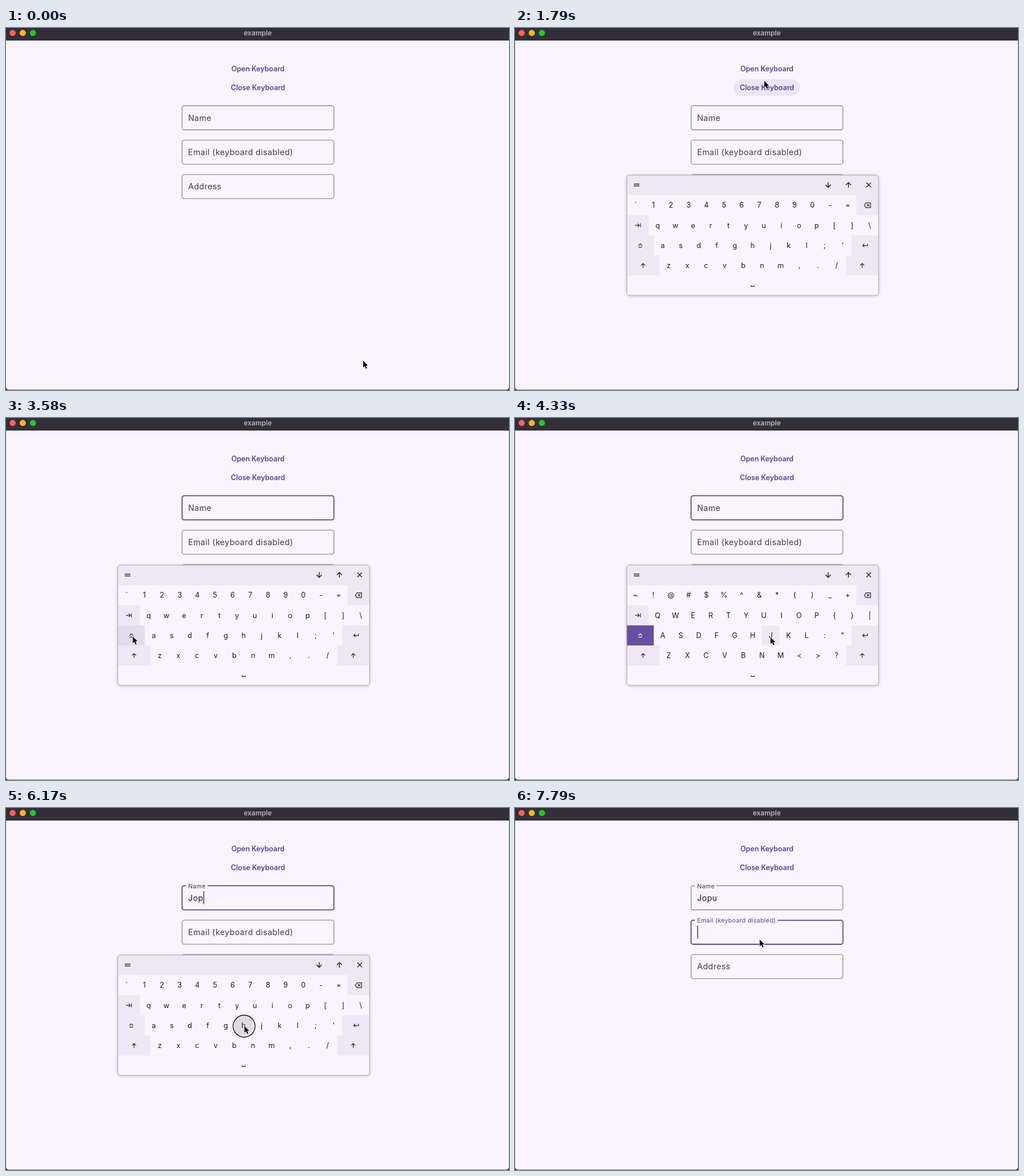
An HTML page that plays this animation: 881x635 px, repeating every 8 s.

```html
<!DOCTYPE html>
<html lang="en">
<head>
<meta charset="utf-8">
<title>example</title>
<style>
  html, body { margin: 0; width: 100%; height: 100%; overflow: hidden; background: #faf4fc; }
  svg { display: block; width: 881px; height: 635px; }
  text { font-family: Inter, Roboto, sans-serif; fill: #1d1b20; white-space: pre; }
  .mid { text-anchor: middle; }
  .key { font-size: 12.7px; text-anchor: middle; }
  .btn { font-size: 12.44px; font-weight: 600; text-anchor: middle; fill: #574392; }
  .field { font-size: 14.2px; letter-spacing: .42px; }
  .icon { fill: none; stroke: #2b2830; stroke-width: 1.2; }
  .bar { stroke-width: 1.5; }
</style>
</head>
<body>
<svg id="stage" viewBox="0 0 881 635"></svg>
<script>
const LOOP = 8000;
const BG = '#faf4fc', TINT = '#eee7f6', INK = '#1d1b20', ACCENT = '#5a4599', LINE = '#7d7881';
const stage = document.getElementById('stage');

function add(parent, tag, attrs = {}, text) {
  const node = document.createElementNS('http://www.w3.org/2000/svg', tag);
  for (const k in attrs) node.setAttribute(k, attrs[k]);
  if (text !== undefined) node.textContent = text;
  parent.appendChild(node);
  return node;
}
const set = (node, attrs) => { for (const k in attrs) node.setAttribute(k, attrs[k]); };
const show = (node, on) => node.setAttribute('visibility', on ? 'visible' : 'hidden');
const clamp = v => Math.max(0, Math.min(1, v));
const smooth = u => u * u * (3 - 2 * u);
const mix = (a, b, u) => a + (b - a) * u;
const rect = (parent, x, y, width, height, fill, more) =>
  add(parent, 'rect', { x, y, width, height, fill, ...more });

// Pointer stops: time, x, y
const STOPS = [
  [0, 625, 583], [130, 625, 583], [900, 441, 72], [1480, 440, 72], [1680, 437, 91],
  [1790, 436, 92], [2130, 435, 98], [2500, 409, 158], [2850, 409, 158], [3600, 221, 383],
  [3830, 221, 383], [4180, 447, 384], [4540, 447, 384], [4790, 222, 384], [4960, 222, 384],
  [5420, 494, 342], [5640, 495, 343], [6050, 417, 381], [6230, 417, 382], [6430, 433, 424],
  [6880, 439, 424], [7330, 428, 230], [LOOP, 428, 230]
];
const CLICKS = [1150, 2020, 2590, 3670, 4400, 4840, 5520, 6120, 6460, 7560];
const PRESSES = { j: [4400, 4480], o: [5520, 5610], h: [6120, 6210], n: [6460, 7000] };
const KEYBOARD = [[1200, 2080], [2640, 7600]];
const CAPS = [3720, 4890];
const TYPED = [4450, 5570, 6170, 6490];
const NAME = 'Jopu';
const NAME_ON = 2640, EMAIL_ON = 7600, EASE = 167;

function pointerAt(t) {
  let i = 1;
  while (i < STOPS.length - 1 && STOPS[i][0] < t) i++;
  const [t0, x0, y0] = STOPS[i - 1], [t1, x1, y1] = STOPS[i];
  const u = smooth(clamp((t - t0) / (t1 - t0)));
  return [mix(x0, x1, u), mix(y0, y1, u)];
}

// Share of the last 100 ms the pointer spent inside a box
const hover = (trail, b) => trail.filter(([x, y]) =>
  x >= b.x && x < b.x + b.w && y >= b.y && y < b.y + b.h).length / trail.length;

// Window
rect(stage, 0, 0, 881, 635, BG);
rect(stage, 0, 0, 881, 22, '#322f38');
['#fe5f57', '#fdb32b', '#2ac131'].forEach((fill, i) =>
  add(stage, 'circle', { cx: 11.6 + 17.8 * i, cy: 8.7, r: 5.4, fill }));
add(stage, 'text', { x: 441, y: 12.6, class: 'mid', 'font-size': 12, 'font-weight': 600, style: 'fill:#b5b2b8' }, 'example');

// Buttons
const buttons = [['Open Keyboard', 57], ['Close Keyboard', 90]].map(([label, y]) => {
  const box = { x: 383, y, w: 116.5, h: 28.4 };
  const pill = rect(stage, box.x, y, box.w, box.h, '#ece5f4', { rx: 14.2 });
  add(stage, 'text', { x: 441.3, y: y + 18.5, class: 'btn' }, label);
  return { box, pill };
});

// Form fields
const fields = [['Name', 136.4, 38], ['Email (keyboard disabled)', 196.8, 145], ['Address', 257, 58]].map(([text, y, gapW]) => {
  const outline = rect(stage, 308.4, y, 266, 42.2, 'none', { rx: 3.6 });
  const gap = rect(stage, 315, y - 2, 0, 4, BG);
  const label = add(stage, 'text', { class: 'field' }, text);
  return { box: { x: 308, y, w: 267, h: 42 }, y, gapW, outline, gap, label };
});
const value = add(stage, 'text', { x: 319, y: 162.7, class: 'field' });
const caret = rect(stage, 319, 146, 1.7, 22.8, ACCENT);

// Keyboard
const KX = 195.8, KY = 258, KW = 441, ROW = 35.25;
const defs = add(stage, 'defs');
const blur = add(defs, 'filter', { id: 'soft', x: '-10%', y: '-10%', width: '120%', height: '120%' });
add(blur, 'feGaussianBlur', { stdDeviation: 3 });
add(add(defs, 'clipPath', { id: 'panel' }), 'rect', { x: KX, y: KY, width: KW, height: 211, rx: 5 });
const keyboard = add(stage, 'g');
rect(keyboard, KX, KY + 1, KW, 211, '#000', { rx: 5, opacity: .22, filter: 'url(#soft)' });
const panel = add(keyboard, 'g', { 'clip-path': 'url(#panel)' });
rect(panel, KX, KY, KW, 211, BG);
rect(panel, KX, KY, KW, ROW, TINT);

const ICONS = {
  back: 'M-2.6 -4.3H5.3V4.3H-2.6L-5.6 0ZM-.9 -2L3.1 2M3.1 -2L-.9 2',
  tab: 'M-5 0H2.6M-.4 -3L2.6 0L-.4 3M4.6 -3.4V3.4',
  caps: 'M-3.2 .4L0 -2.7L3.2 .4M-3.3 3H3.3',
  enter: 'M4.3 -2.8V.2H-4M-1.4 -2.6L-4.2 .2L-1.4 3',
  shift: 'M0 4V-3.4M-3.5 0L0 -3.5L3.5 0',
  space: 'M-2.8 -.4V1.5H2.8V-.4',
  up: 'M0 4.8V-4.2M-4.5 .2L0 -4.3L4.5 .2',
  down: 'M0 -4.8V4.2M-4.5 -.2L0 4.3L4.5 -.2',
  close: 'M-4 -4L4 4M4 -4L-4 4',
  grip: 'M-5 -1.6H5M-5 1.6H5'
};
const icon = (parent, name, x, y, cls = 'icon') =>
  add(parent, 'path', { d: ICONS[name], transform: `translate(${x} ${y})`, class: cls });

[['grip', 213], ['down', 548.5], ['up', 584], ['close', 619.5]].forEach(([name, x]) =>
  icon(panel, name, x, 275.3, 'icon bar'));

// Each row: left key, lower case, upper case, right key, width of the side keys
const ROWS = [
  ['', '`1234567890-=', '~!@#$%^&*()_+', 'back', 1.25],
  ['tab', 'qwertyuiop[]\\', 'QWERTYUIOP{}|', '', 1.25],
  ['caps', "asdfghjkl;'", 'ASDFGHJKL:"', 'enter', 1.5],
  ['shift', 'zxcvbnm,./', 'ZXCVBNM<>?', 'shift', 1.75],
  ['', '', '', 'space', 1]
];
const keys = [];
ROWS.forEach(([left, low, high, right, side], r) => {
  const sides = (left ? side : 0) + (right ? side : 0);
  const unit = KW / (low.length + sides);
  const y = KY + ROW * (r + 1), cy = y + ROW / 2;
  let x = KX;
  const place = (name, w, lower, upper) => {
    const base = rect(panel, x, y, w, ROW, lower || name === 'space' ? BG : TINT);
    const glow = rect(panel, x, y, w, ROW, '#2a1826', { 'fill-opacity': 0 });
    const key = { name, lower, upper, base, glow, box: { x, y, w, h: ROW } };
    if (lower) key.text = add(panel, 'text', { x: x + w / 2, y: cy + 4.6, class: 'key' });
    else key.icon = icon(panel, name, x + w / 2, cy);
    keys.push(key);
    x += w;
  };
  if (left) place(left, unit * side);
  [...low].forEach((c, i) => place(c, unit, c, high[i]));
  if (right) place(right, unit * side);
});
const capsKey = keys.find(k => k.name === 'caps');
rect(keyboard, KX, KY, KW, 211, 'none', { rx: 5, stroke: '#aaa5ad', 'stroke-width': 1 });

// Window edge and corners
const edge = add(stage, 'path', { d: 'M.5 22V634M880.5 22V634', stroke: '#d3ced6', 'stroke-width': 1 });
add(stage, 'path', { d: 'M0 634.5H881', stroke: '#858089', 'stroke-width': 1 });
add(stage, 'path', { d: 'M0 630Q.5 634.5 5 635H0ZM881 630Q880.5 634.5 876 635H881Z', fill: '#17133a' });

// Pointer
const ring = add(stage, 'circle', { r: 19.2, fill: 'none', stroke: '#111', 'stroke-width': 1.4 });
const pointer = add(stage, 'path', {
  d: 'M.6 .5V12.6L3.4 10L5.4 14.6L7.4 13.7L5.4 9.2H9Z',
  fill: '#000', stroke: '#fff', 'stroke-width': 1.3, 'paint-order': 'stroke', 'stroke-linejoin': 'round'
});

function drawField(f, trail, focus, float, labelColor) {
  const over = hover(trail, f.box) > .3;
  set(f.outline, {
    stroke: focus > .5 ? ACCENT : over ? INK : LINE,
    'stroke-width': mix(1.1, 1.8, focus)
  });
  set(f.gap, { width: f.gapW * float });
  set(f.label, {
    transform: `translate(319 ${mix(f.y + 26.3, f.y + 4.3, float)}) scale(${mix(1, .75, float)})`,
    style: `fill:${labelColor}`
  });
}

function draw(t) {
  const [px, py] = pointerAt(t);
  const trail = Array.from({ length: 12 }, (_, i) => pointerAt(Math.max(0, t - i * 9)));
  const open = KEYBOARD.some(([a, b]) => t >= a && t < b);
  const upper = t >= CAPS[0] && t < CAPS[1];

  show(edge, t >= 400);
  buttons.forEach(b => set(b.pill, { 'fill-opacity': hover(trail, b.box) }));

  // Text entry and focus
  const count = TYPED.filter(at => t >= at).length;
  const emailOn = t >= EMAIL_ON;
  const emailU = smooth(clamp((t - EMAIL_ON) / EASE));
  const nameU = smooth(clamp((t - NAME_ON) / EASE)) * (1 - emailU);
  const formTrail = open ? trail.map(([x, y]) => [x, y < KY ? y : -1]) : trail;
  drawField(fields[0], formTrail, nameU, smooth(clamp((t - TYPED[0]) / EASE)), '#3f3b45');
  drawField(fields[1], formTrail, emailU, emailU, emailU > .5 ? ACCENT : '#3f3b45');
  drawField(fields[2], formTrail, 0, 0, '#3f3b45');
  value.textContent = NAME.slice(0, count);

  const since = emailOn ? EMAIL_ON : count ? TYPED[count - 1] : NAME_ON;
  show(caret, t >= NAME_ON && (t - since) % 1000 < 490);
  set(caret, {
    x: 319 + (count && !emailOn ? value.getComputedTextLength() : 0),
    y: emailOn ? 206.4 : 146
  });

  // Keyboard
  show(keyboard, open);
  if (open) {
    keys.forEach(k => {
      if (k.text) k.text.textContent = upper ? k.upper : k.lower;
      const press = PRESSES[k.name];
      const down = press ? clamp((t - press[0]) / 40) * clamp(1 - (t - press[1]) / 200) : 0;
      set(k.glow, { 'fill-opacity': Math.max(.05 * hover(trail, k.box), .12 * down) });
    });
    set(capsKey.base, { fill: upper ? '#674fa0' : TINT });
    set(capsKey.icon, { style: upper ? 'stroke:#fff' : '' });
  }

  show(ring, CLICKS.some(at => t >= at && t < at + 150));
  set(ring, { cx: px, cy: py + 1 });
  set(pointer, { transform: `translate(${px} ${py})` });
}

const start = performance.now();
function tick() {
  draw((performance.now() - start) % LOOP);
  requestAnimationFrame(tick);
}
tick();
</script>
</body>
</html>
```
